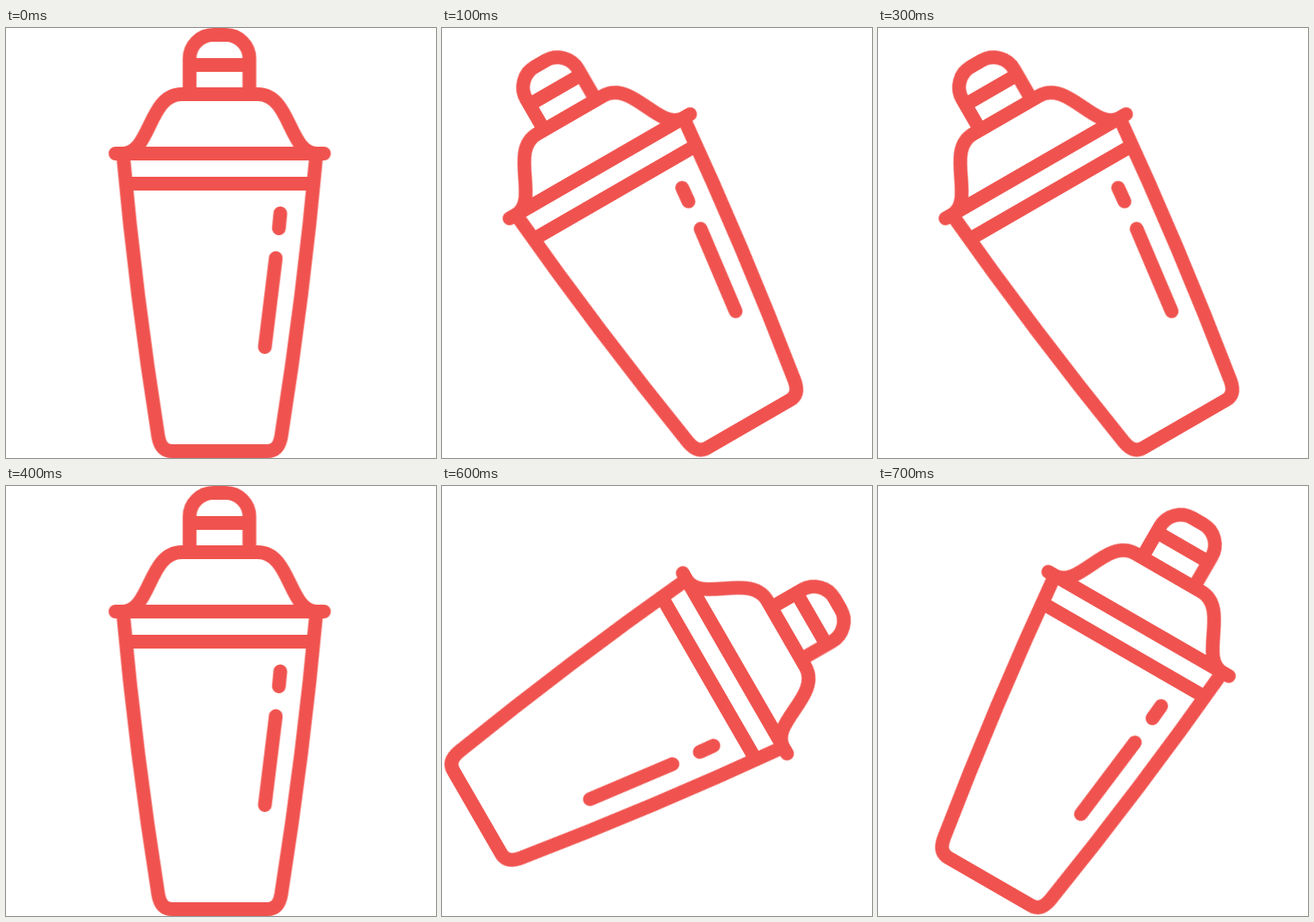
An HTML page for the animation above (0.8 s loop, 500x500 px).

```html
<!DOCTYPE html>
<html lang="en">
<head>
<meta charset="utf-8">
<title>Shaker</title>
<style>
  html, body { margin: 0; width: 100%; height: 100%; overflow: hidden; background: #fff; }
  svg { display: block; width: 100vw; height: 100vh; }
  #shaker {
    fill: none;
    stroke: #f0534f;
    stroke-width: 16;
    stroke-linecap: round;
    stroke-linejoin: round;
    transform-origin: 0 0;
  }
  .flat { stroke-linecap: butt; }
</style>
</head>
<body>
<svg viewBox="0 0 500 500">
  <g id="shaker">
    <!-- drawn upright, shifted so the middle of the rim is the origin -->
    <g transform="translate(-248.5 -146)">
      <path class="flat" d="M213.5 77V35.5A27.5 27.5 0 0 1 241 8H255.5A27.5 27.5 0 0 1 283 35.5V77M213.5 43H283"/>
      <path d="M136 146C168 146 166 77 204 77H293C331 77 329 146 361 146"/>
      <path d="M127.3 146H369.7"/>
      <path class="flat" d="M141 181H356"/>
      <path d="M136 146Q151 311 177 475C179 486 184 492 193 492H304C313 492 318 486 320 475Q346 311 361 146"/>
      <path d="M319 215.5L317.3 233M313.7 267.5L301 371"/>
    </g>
  </g>
</svg>
<script>
  // rim position and tilt, one row per 100 ms
  const upright = [248.5, 146, 0];
  const left = [183.5, 160.8, -30];
  const right = [303, 160.4, 30];
  const poses = [
    upright, left, [142.5, 206.7, -60], left,
    upright, right, [340.6, 206.2, 60], right
  ];

  const frames = [...poses, upright].map(([x, y, deg], i) => ({
    offset: i / poses.length,
    transform: `translate(${x}px, ${y}px) rotate(${deg}deg)`,
    easing: 'steps(1, end)'
  }));

  document.getElementById('shaker').animate(frames, {
    duration: poses.length * 100,
    iterations: Infinity
  });
</script>
</body>
</html>
```
